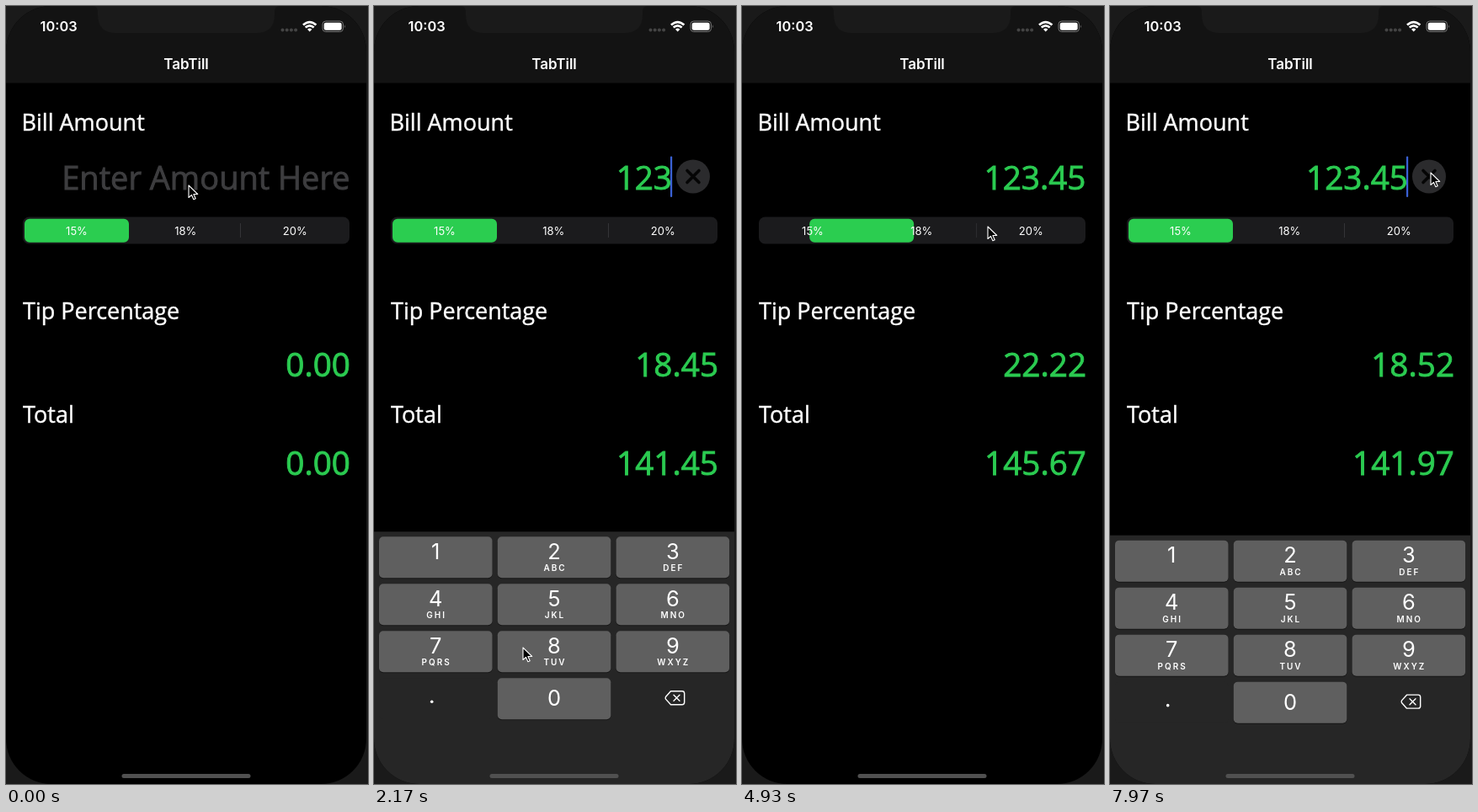
Animation of 430x924 px, one loop 8 s. Source, as an HTML page:

```html
<!DOCTYPE html>
<html lang="en">
<head>
<meta charset="utf-8">
<title>Tip calculator</title>
<style>
html, body { margin: 0; width: 100%; height: 100%; overflow: hidden; background: #1a1a1a; }
svg { display: block; width: 430px; height: 924px; }
text { fill: #fff; font-family: Inter, Roboto, sans-serif; }
.label { font: 27px "Open Sans", "Noto Sans", sans-serif; stroke: #fff; stroke-width: .45px; }
.value { font: 38.7px "Open Sans", "Noto Sans", sans-serif; fill: #2bcb51; stroke: #2bcb51; stroke-width: .9px; text-anchor: end; }
.hint { font-size: 38px; fill: #3d3d3f; stroke: #3d3d3f; }
.mid { text-anchor: middle; }
.strong { font-weight: 600; }
.digit { font-size: 25.5px; }
.letters { font-size: 10px; font-weight: 600; letter-spacing: 2px; }
.line { fill: none; stroke: #fff; stroke-linecap: round; stroke-linejoin: round; }
</style>
</head>
<body>
<svg viewBox="0 0 430 924">
  <clipPath id="screen"><rect width="428" height="924" rx="54"/></clipPath>
  <g clip-path="url(#screen)">
    <rect width="428" height="924"/>
    <rect width="428" height="91.5" fill="#131313"/>
    <path d="M103 0Q109 0 109 7V10Q109 32 131 32H297Q319 32 319 10V7Q319 0 325 0Z" fill="#1a1a1a"/>

    <text class="strong" x="40.5" y="30" font-size="16.4">10:03</text>
    <g fill="#444"><circle cx="328.5" cy="28.5" r="2"/><circle cx="333.7" cy="28.5" r="2"/><circle cx="338.9" cy="28.5" r="2"/><circle cx="344.1" cy="28.5" r="2"/></g>
    <g class="line" style="stroke-width:2.7;stroke-linecap:butt">
      <path d="M353 22.6Q360.7 15.6 368.4 22.6M355.7 25.6Q360.7 21.2 365.7 25.6"/>
    </g>
    <path d="M360.7 30.5L358 27.7Q360.7 25.5 363.4 27.7Z" fill="#fff"/>
    <rect x="376" y="18" width="24.5" height="12.5" rx="3.8" fill="none" stroke="#777"/>
    <rect x="377.7" y="19.7" width="21" height="9" rx="2.3" fill="#fff"/>
    <path d="M402 22.3Q403.8 24.2 402 26.2Z" fill="#777"/>
    <text class="mid strong" x="214" y="75" font-size="17">TabTill</text>

    <text class="label" x="18.5" y="148">Bill Amount</text>
    <text class="label" x="20" y="371.5">Tip Percentage</text>
    <text class="label" x="20" y="494.5">Total</text>
    <text id="bill" y="217.5"></text>
    <text id="tip" class="value" x="409" y="440"></text>
    <text id="total" class="value" x="409" y="557"></text>

    <g id="clear">
      <circle cx="379" cy="202.5" r="20" fill="#2b2b2d"/>
      <path d="M372 195.5l14 14m0-14l-14 14" stroke="#050505" stroke-width="3.6" stroke-linecap="round"/>
    </g>
    <rect id="caret" y="178.5" width="2.2" height="48.5" rx="1" fill="#3b62d6"/>

    <rect x="20" y="250.5" width="388" height="32" rx="7.5" fill="#1b1b1d"/>
    <rect id="divider0" x="148.5" y="258" width="1" height="17" fill="#343437"/>
    <rect id="divider1" x="278" y="258" width="1" height="17" fill="#343437"/>
    <rect id="thumb" y="252.7" width="124" height="28" rx="6" fill="#2bcd50"/>
    <g class="mid" font-size="13">
      <text x="84" y="271.5">15%</text><text x="213.3" y="271.5">18%</text><text x="343.3" y="271.5">20%</text>
    </g>

    <g id="keyboard"><rect width="428" height="310" fill="#262626"/></g>
    <rect x="137.5" y="912" width="153" height="5" rx="2.5" fill="#505050"/>
  </g>
  <path id="pointer" d="M0 0V14.5L3.5 11.4L5.9 16.7L8.2 15.7L5.9 10.5H10.7Z" fill="#000" stroke="#fff" stroke-width="1.1" stroke-linejoin="round"/>
</svg>
<script>
const LOOP = 8000;
const SEGMENT_X = [22, 151, 281];
const RATES = [0.15, 0.18, 0.2];
const typed = [['1', 1060], ['2', 1420], ['3', 1800], ['.', 2560], ['4', 3270], ['5', 3600]];
const picks = [[-1000, 0], [4874.5, 1], [5650, 2], [7067, 0]];   // time, segment
const FOCUS = 110, BLUR = 3963.2, REFOCUS = 7630;
const route = [   // time, x, y of the pointer
  [0, 217, 213], [50, 217, 213], [530, 162, 574], [670, 162, 574], [950, 68, 652],
  [1080, 68, 652], [1340, 205, 654], [1440, 205, 654], [1700, 340, 656], [1830, 340, 656],
  [2170, 177, 762], [2440, 68, 820], [2680, 68, 820], [3140, 68, 708], [3290, 68, 708],
  [3510, 205, 708], [3620, 205, 708], [3830, 251, 563], [4040, 251, 563], [4790, 255, 265],
  [4860, 262, 265], [4930, 292, 262], [5370, 340, 264], [5700, 340, 264], [6900, 88, 265],
  [7080, 88, 265], [7330, 282, 216], [7590, 366, 200], [7900, 381, 198], [8000, 381, 198]
];

const $ = id => document.getElementById(id);
const clamp = v => Math.max(0, Math.min(1, v));
const show = (id, visible) => $(id).setAttribute('visibility', visible ? 'visible' : 'hidden');

function add(parent, tag, attrs, content = '') {
  const node = document.createElementNS('http://www.w3.org/2000/svg', tag);
  for (const name in attrs) node.setAttribute(name, attrs[name]);
  node.textContent = content;
  return parent.appendChild(node);
}

// Critically damped spring: 0 at the start, 1 at rest
function spring(ms, speed) {
  const s = Math.max(0, ms) * speed / 1000;
  return 1 - (1 + s) * Math.exp(-s);
}

const keyFaces = {};
const letters = ['', 'ABC', 'DEF', 'GHI', 'JKL', 'MNO', 'PQRS', 'TUV', 'WXYZ'];
function buildKeyboard() {
  const board = $('keyboard');
  [...'123456789.0'].forEach((key, i) => {
    const x = 6 + i % 3 * 140.8, y = 6 + Math.floor(i / 3) * 56, cx = x + 67.2;
    const box = { x, width: 134.5, height: 49, rx: 5 };
    if (key !== '.') add(board, 'rect', { ...box, y: y + 1, fill: '#161616' });
    keyFaces[key] = add(board, 'rect', { ...box, y });
    if (key === '.') {
      add(board, 'circle', { cx: 68.7, cy: 202, r: 1.8, fill: '#fff' });
      return;
    }
    add(board, 'text', { class: 'mid digit', x: cx, y: y + (key === '0' ? 33 : 26.5) }, key);
    add(board, 'text', { class: 'mid letters', x: cx + 1, y: y + 41 }, letters[i]);
  });
  add(board, 'path', {
    class: 'line', 'stroke-width': 1.4,
    d: 'M352.5 189.5H366Q368.7 189.5 368.7 192.2V202.8Q368.7 205.5 366 205.5H352.5L346.5 198.8Q345.8 197.5 346.5 196.2ZM356 194l7 7m0-7l-7 7'
  });
}

function pointerAt(t) {
  const i = route.findIndex(p => p[0] > t), a = route[i - 1], b = route[i];
  const u = (t - a[0]) / (b[0] - a[0]), e = u * u * (3 - 2 * u);
  return [1, 2].map(k => a[k] + (b[k] - a[k]) * e);
}

function drawSegments(t) {
  const n = picks.filter(p => p[0] <= t).length - 1;
  const [since, now] = picks[n], before = n ? picks[n - 1][1] : now;
  const from = SEGMENT_X[before], to = SEGMENT_X[now];
  $('thumb').setAttribute('x', from + (to - from) * spring(t - since, 27));
  const fade = clamp((t - since) / 200);
  for (const d of [0, 1]) {
    const visible = s => s !== d && s !== d + 1 ? 1 : 0;
    $('divider' + d).setAttribute('opacity', visible(before) * (1 - fade) + visible(now) * fade);
  }
  return RATES[now];
}

function drawAmounts(t, rate) {
  const text = typed.filter(k => k[1] <= t).map(k => k[0]).join('');
  const editing = t >= 60 && t < BLUR || t >= REFOCUS;
  const inset = editing && text !== '';
  const amount = parseFloat(text) || 0;
  const bill = $('bill');
  bill.textContent = text || 'Enter Amount Here';
  bill.setAttribute('class', text ? 'value' : 'value hint');
  bill.setAttribute('x', inset ? 354 : 408.5);
  $('tip').textContent = (amount * rate).toFixed(2);
  $('total').textContent = (amount * (1 + rate)).toFixed(2);
  $('caret').setAttribute('x', inset ? 352 : 406);
  show('caret', editing);
  show('clear', inset);
}

function drawKeyboard(t) {
  const raised = t < BLUR ? spring(t - FOCUS, 18.2)
    : t < REFOCUS ? 1 - spring(t - BLUR, 18.2) : spring(t - REFOCUS, 18.2);
  $('keyboard').setAttribute('transform', `translate(0 ${924.3 - 300 * raised})`);
  for (const key in keyFaces) {
    const pressed = typed.some(([k, at]) => k === key && t >= at - 90 && t < at + 40);
    const idle = key === '.' ? '#262626' : '#5f5f5f';
    keyFaces[key].setAttribute('fill', pressed ? '#434343' : idle);
  }
}

function draw() {
  const t = performance.now() % LOOP;
  drawAmounts(t, drawSegments(t));
  drawKeyboard(t);
  $('pointer').setAttribute('transform', `translate(${pointerAt(t)})`);
  requestAnimationFrame(draw);
}

buildKeyboard();
draw();
</script>
</body>
</html>
```
